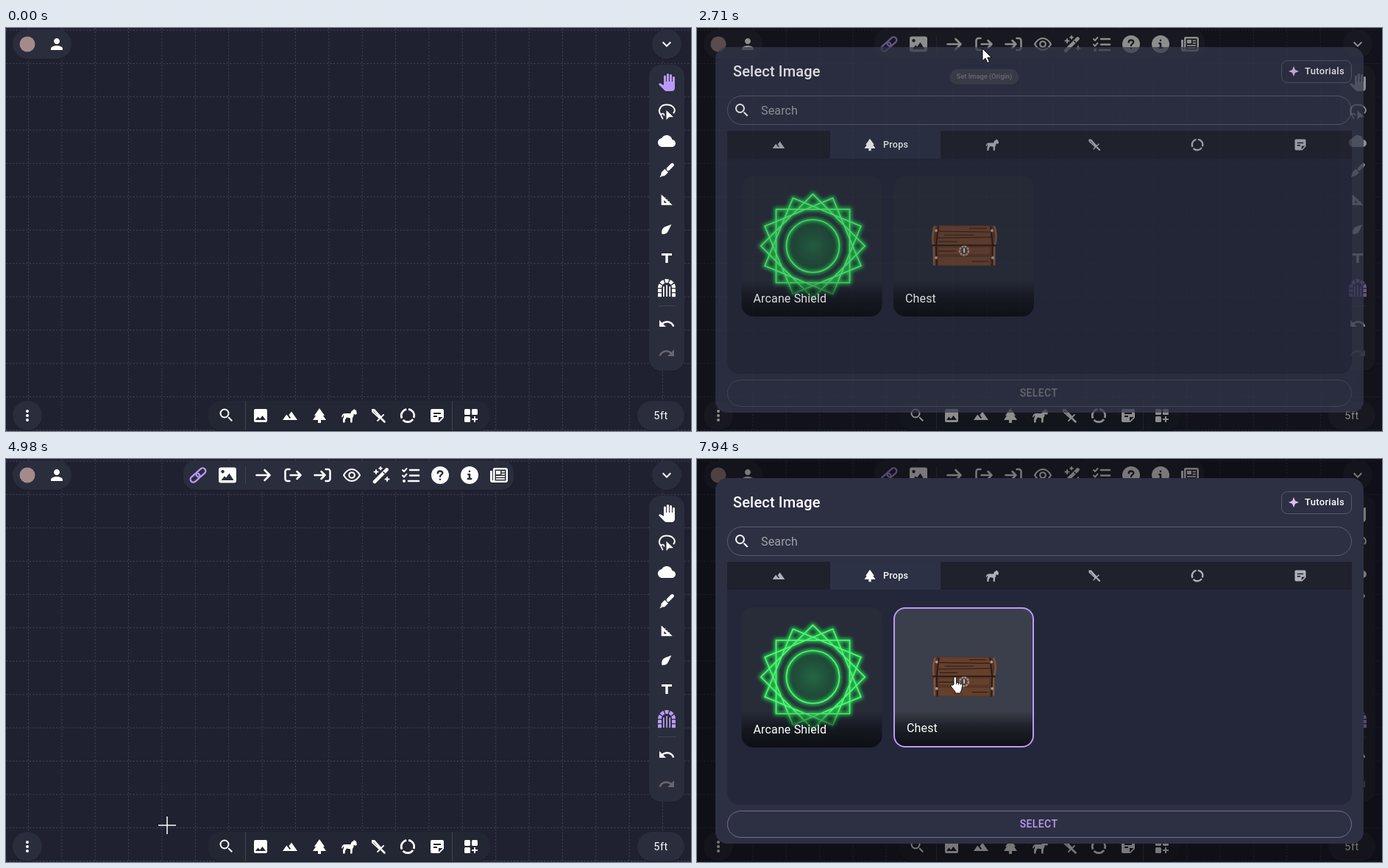
Animation of 931x549 px, one loop 8000 ms. Source, as an HTML page:

```html
<!DOCTYPE html>
<html lang="en">
<head>
<meta charset="utf-8">
<title>Portal tool</title>
<style>
  html, body { margin: 0; width: 100%; height: 100%; overflow: hidden; background: #1f2130; }
  svg { display: block; }
  text { font-family: Roboto, sans-serif; fill: #fff; }
</style>
</head>
<body>
<svg id="stage" width="931" height="549" viewBox="0 0 931 549"></svg>
<script>
const LOOP = 8000, PURPLE = '#bb9af7';

const line = (d, w = 2, extra = '') =>
  `<path d="${d}" fill="none" stroke="currentColor" stroke-width="${w}" stroke-linecap="round" stroke-linejoin="round" ${extra}/>`;
const shape = d => `<path d="${d}" fill-rule="evenodd"/>`;
const box = (x, y, w, h, r, fill, extra = '') =>
  `<rect x="${x}" y="${y}" width="${w}" height="${h}" rx="${r}" fill="${fill}" ${extra}/>`;
const text = (x, y, size, str, extra = '') =>
  `<text x="${x}" y="${y}" font-size="${size}" ${extra}>${str}</text>`;

// Icons live in a 24 x 24 box
const icons = {
  person: shape('M12 12c2.2 0 4-1.8 4-4s-1.8-4-4-4-4 1.8-4 4 1.8 4 4 4zm0 2c-2.7 0-8 1.3-8 4v2h16v-2c0-2.7-5.3-4-8-4z'),
  chevron: shape('M16.6 8.6 12 13.2 7.4 8.6 6 10l6 6 6-6z'),
  more: [6, 12, 18].map(y => `<circle cx="12" cy="${y}" r="2"/>`).join(''),
  search: '<circle cx="9.5" cy="9.5" r="5.5" fill="none" stroke="currentColor" stroke-width="2"/>' + shape('M14 15.4l1.4-1.4 5.1 5-1.5 1.5z'),
  image: shape('M21 19V5c0-1.1-.9-2-2-2H5c-1.1 0-2 .9-2 2v14c0 1.1.9 2 2 2h14c1.1 0 2-.9 2-2zM8.5 13.5l2.5 3L14.5 12l4.5 6H5z'),
  terrain: shape('M14 6.5l-3.6 4.8 2.7 3.6-1.5 1.1L7.3 10.600 2 18h20z'),
  tree: shape('M17 12h2L12 2 5 12h2l-3.900 6H10v4h4v-4h7z'),
  horse: shape('M22 5l-3-2-1 1.500c-2 .5-3 2-3.500 4.500H7c-3 0-4.500 1.500-5 5l1.500.5c.2-1.500.5-2.500 1.500-3v3l-1 2v5h2.500l.5-4 2-3 5 1v6h2.500l.5-6.500c1.500-1.500 1.500-3 1.500-5l3 .8 1.400-1.500z'),
  sword: shape('M3 3h4l10 11-3 3L3 7zM5.500 5.500v1l7.500 8z') + line('M11 19l8-8', 1.8) + line('M16.500 16.500l4 4', 2.6),
  ring: '<circle cx="12" cy="12" r="8.700" fill="none" stroke="currentColor" stroke-width="2.800" stroke-dasharray="15.500 2.720" transform="rotate(35 12 12)"/>',
  note: shape('M19 3H5c-1.100 0-2 .9-2 2v14c0 1.100.9 2 2 2h10l6-6V5c0-1.100-.9-2-2-2zM7 8h10v2H7zm0 4h5v2H7zm7 7.500V14h5.500z'),
  widgets: box(3, 3, 8, 8, 1.5, 'currentColor') + box(13, 3, 8, 8, 1.5, 'currentColor') + box(3, 13, 8, 8, 1.5, 'currentColor') + shape('M16 13h2v3h3v2h-3v3h-2v-3h-3v-2h3z'),
  hand: shape('M23 5.5V20c0 2.2-1.8 4-4 4h-7.3c-1.1 0-2.1-.4-2.850-1.200L1 14.800s1.300-1.200 1.300-1.200c.4-.3.9-.4 1.400-.1L8 15.900V4c0-.8.7-1.500 1.500-1.500S11 3.200 11 4v7h1V1.500C12 .7 12.700 0 13.500 0S15 .7 15 1.500V11h1V2.500c0-.8.7-1.500 1.500-1.500s1.500.7 1.500 1.500V11h1V5.500c0-.8.7-1.500 1.500-1.500s1.500.7 1.500 1.500z'),
  lasso: line('M4.500 16.500C-1 11 3 2.500 12 2.500s13 7 9.500 11') + line('M8.500 17a2.200 2.200 0 1 0-3.500 1.500l1.500 3', 1.7) + shape('M11.500 10v13l3.800-3.800H21z'),
  cloud: shape('M19.350 10C18.700 6.600 15.600 4 12 4 9.100 4 6.600 5.600 5.350 8 2.300 8.400 0 10.900 0 14c0 3.300 2.700 6 6 6h13c2.800 0 5-2.200 5-5 0-2.600-2-4.800-4.650-5z'),
  marker: line('M14 10l5.500-5.500', 4.8) + shape('M9.300 10l4.700 4.700-5 4.800H6.800L2.500 21.500l2-4.300V15z'),
  ruler: shape('M4 4v16h16.500zM8 12.500l4.200 4.200H8z') + line('M9 9.500l1-1M12 12.500l1-1M15 15.500l1-1', 1),
  drop: shape('M19 5L9.500 8.500C4.500 11 4 16 5 19.300c4 .7 7.500-.5 9.500-5z'),
  type: shape('M5 5v3h5.300v10h3.400V8H19V5z'),
  arch: line('M2.500 12a9.500 9.500 0 0 1 19 0', 5, 'style="stroke-linecap:butt" stroke-dasharray="4.850 1.400"') +
    [0, 19].map(x => box(x, 13.2, 5, 4.8, .6, 'currentColor') + box(x, 19.2, 5, 5, .6, 'currentColor')).join('') +
    [[7, 10], [11.2, 8], [15.4, 10]].map(([x, y]) => box(x, y, 1.7, 24 - y, .6, 'currentColor')).join(''),
  undo: shape('M12.500 8c-2.600 0-5 1-6.900 2.600L2 7v9h9l-3.600-3.600c1.400-1.200 3.200-1.900 5.100-1.900 3.500 0 6.500 2.300 7.600 5.500l2.400-.8C21.100 11 17.100 8 12.500 8z'),
  link: `<g transform="rotate(-42 12 12)" fill="none" stroke="currentColor" stroke-width="2.300"><rect x="-.5" y="8" width="14.500" height="8" rx="4"/><rect x="10" y="8" width="14.500" height="8" rx="4"/></g>`,
  picture: shape('M3 1.500h18a3 3 0 0 1 3 3v15a3 3 0 0 1-3 3H3a3 3 0 0 1-3-3v-15a3 3 0 0 1 3-3zM5.500 5a2.200 2.200 0 1 0 .01 0zM3.500 19h17L14.500 9.500l-4.500 6-2-2.300z'),
  arrow: line('M2.500 12h18M13.500 5l7 7-7 7', 2.6),
  leave: line('M7.500 4H4.500A3 3 0 0 0 1.500 7v10a3 3 0 0 0 3 3h3M8.500 12H22.500M17.500 7l5 5-5 5', 2.5),
  enter: line('M16.500 4h3a3 3 0 0 1 3 3v10a3 3 0 0 1-3 3h-3M1.500 12H15.500M10.500 7l5 5-5 5', 2.5),
  eye: line('M1 12C4.500 5.800 8.500 4 12 4s7.500 1.800 11 8c-3.500 6.200-7.500 8-11 8S4.500 18.200 1 12z', 2.1) + '<circle cx="12" cy="12" r="3.800" fill="none" stroke="currentColor" stroke-width="2.100"/>',
  wand: line('M3 21 19.500 4.500', 4.6) + '<path d="M14.500 7.500l2.500 2.500" stroke="#2a2d3b" stroke-width="1.500"/>' +
    line('M5 5v5M2.500 7.500h5M11 1v3.600M9.200 2.800h3.600M20 15v5M17.500 17.500h5', 1.9),
  checks: line('M1 5l2 2 3.500-4M1 12.500l2 2 3.500-4', 2) + line('M11 5h12M11 12.500h12M9 20h14', 2.6) + '<circle cx="3" cy="20" r="2"/>',
  help: '<circle cx="12" cy="12" r="12"/><g color="#2a2d3b">' + line('M8.700 9.300c.3-3.800 6.800-3.500 6.600 0-.1 2-3.300 2.200-3.300 4.500M12 17.700v.1', 2.4) + '</g>',
  info: '<circle cx="12" cy="12" r="12"/><g color="#2a2d3b">' + line('M10.300 11H12v6M9.800 17h4.500M12 6.800v.1', 2.4) + '</g>',
  news: shape('M6 2h15a3 3 0 0 1 3 3v14a3 3 0 0 1-3 3H3a3 3 0 0 1-3-3V6h3v13h1V4a2 2 0 0 1 2-2zM6.500 4.500v15h15v-15zM8 6h6v5H8zM15.500 6.500H20v1.800h-4.500zm0 3.300H20v1.800h-4.500zM8 13h12v1.800H8zm0 3.300h12v1.800H8z')
};
const icon = (name, cx, cy, size = 24, color = '#fff', id = '') =>
  `<g ${id && `id="${id}"`} color="${color}" fill="currentColor" transform="translate(${cx - size / 2} ${cy - size / 2}) scale(${size / 24})">${icons[name]}</g>`;

const panel = (x, y, w, h, r, fill = '#2a2d3b') =>
  box(x, y + 1, w, h, r, '#191b27') + box(x, y, w, h, r, fill);
const rule = (x, y, w, h) => box(x, y, w, h, 0, '#424450');

function grid() {
  let d = '';
  for (let x = 30.5; x < 931; x += 45.37) d += `M${x} 0V549`;
  for (let y = 3; y < 549; y += 45.4) d += `M0 ${y}H931`;
  return `<path d="${d}" stroke="#44465300" /><path d="${d}" fill="none" stroke="#414350" stroke-dasharray="2.300 2.240"/>`;
}

function room() {
  const tools = ['lasso', 'cloud', 'marker', 'ruler', 'drop', 'type'];
  const dock = ['image', 'terrain', 'tree', 'horse', 'sword', 'ring', 'note'];
  const actions = ['arrow', 'leave', 'enter', 'eye', 'wand', 'checks', 'help', 'info', 'news'];
  return grid() +
    panel(9, 2, 80, 40, 20) + '<circle cx="29" cy="22" r="10.500" fill="#a48a8c"/>' + icon('person', 69, 22) +
    panel(878, 2, 40, 40, 20) + icon('chevron', 898, 22) +
    panel(9, 508, 40, 40, 20) + icon('more', 29, 528) +
    panel(858, 508, 64, 40, 20) + text(890, 533, 14.5, '5ft', 'text-anchor="middle" letter-spacing=".5"') +
    panel(874, 50, 48, 417, 16) + icon('hand', 898, 74, 24, '#fff', 'pan') +
    tools.map((n, i) => icon(n, 898, 114 + i * 40, n == 'ruler' || n == 'drop' ? 22 : 24)).join('') +
    icon('arch', 898, 354, 24, '#fff', 'arch') + rule(886, 378, 24, 1) + icon('undo', 898, 403) +
    `<g transform="matrix(-1 0 0 1 1796 40)">${icon('undo', 898, 403, 24, '#6a666e')}</g>` +
    panel(275, 508, 382, 40, 16, '#232633') + icon('search', 299.5, 527.5) + rule(325, 508, 1, 40) +
    dock.map((n, i) => icon(n, 346 + i * 40, 528)).join('') + rule(606, 508, 1, 40) + icon('widgets', 632, 528) +
    `<g id="bar">${panel(241, 2, 449, 40, 16)}${icon('link', 261, 22, 24, PURPLE)}${icon('picture', 301, 22)}${rule(325, 10, 1, 24)}` +
    actions.map((n, i) => icon(n, 350 + i * 40, 22)).join('') + '</g>' +
    '<circle id="hover" r="20" fill="#fff" fill-opacity=".08"/>';
}

function shield() {
  const squares = [0, 22.5, 45, 67.5].map(a =>
    `<rect x="-50" y="-50" width="100" height="100" transform="rotate(${a})"/>`).join('') + '<circle r="36"/>';
  return `<g transform="translate(157.500 297)" fill="none"><circle r="36" fill="url(#glow)"/>` +
    `<g stroke="#1fd04a" stroke-width="5" filter="url(#blur)">${squares}</g>` +
    `<g stroke="#5cf07c" stroke-width="1.700">${squares}</g></g>`;
}

function chest() {
  const rivets = [[325, 276], [401, 276], [325, 313], [402, 313]].map(([x, y]) =>
    `<circle cx="${x}" cy="${y}" r="2" fill="#a8978a"/>`).join('');
  return '<path d="M322 269h82c3 8 4 18 2 27l-1 28h-84l-1-28c-2-9-1-19 2-27z" fill="#553526"/>' +
    '<path d="M329 270h69l2 25h-73zM328 299h70v9h-70zM328 312h70v11h-70z" fill="#65402d"/>' +
    '<path d="M328 277l70 1M327 286l73-1M329 291h25M370 273h24M328 304h24M374 318h22M336 282h40" stroke="#2e1c17" stroke-width="1.100" fill="none"/>' +
    '<path d="M319 296h88M328 270l-3 26 1 28M399 270l3 26-1 28" stroke="#241713" stroke-width="1.600" fill="none"/>' +
    '<path d="M323 270c-3 8-3 18-2 25M404 270c3 8 3 18 1 25M322 298v25M404 298v25" stroke="#7d5541" stroke-width="2.500" fill="none"/>' + rivets +
    '<circle cx="363" cy="303.500" r="6" fill="#4b4240" stroke="#a79180" stroke-width="2.500" stroke-dasharray="3 1"/><path d="M363 300v6" stroke="#d0c0b0" stroke-width="2"/>';
}

const card = (id, x, label, art) =>
  `<g id="${id}">${box(x, 202, 191, 191, 16, '#282c39', 'class="back"')}<g class="art">${art}</g>` +
  box(x, 202, 191, 191, 16, 'url(#shade)') + text(x + 16, 374, 16, label, 'class="label" letter-spacing=".15"') +
  box(x + 1, 203, 189, 189, 15, 'none', `class="frame" stroke="${PURPLE}" stroke-width="2"`) + '</g>';

function dialog() {
  const tabs = [['terrain', 111], ['horse', 401], ['sword', 540], ['ring', 680], ['note', 820]];
  return box(0, 0, 931, 549, 0, '#000', 'fill-opacity=".53"') + box(25, 26, 881, 498, 16, '#2d3042') +
    text(49, 66, 20, 'Select Image', 'font-weight="500" letter-spacing=".15"') +
    box(794.5, 44.5, 95, 30, 8, 'none', 'stroke="#575a6a"') +
    '<path d="M811 52l2 5 5 2-5 2-2 5-2-5-5-2 5-2z" fill="#e3bdea"/>' +
    text(826, 63, 13, 'Tutorials', 'font-weight="500" letter-spacing=".3"') +
    box(41.5, 92.5, 848, 39, 19.5, 'none', 'id="field"') + icon('search', 61, 112) +
    text(87, 118, 16, 'Search', 'letter-spacing=".15" fill-opacity=".55"') +
    box(41, 140, 849, 60, 0, '#1f212d') + '<path d="M41 178H890V455a16 16 0 0 1-16 16H57a16 16 0 0 1-16-16z" fill="#242739"/>' +
    box(181, 140, 150, 38, 0, '#2d3145') +
    tabs.map(([n, x]) => icon(n, x, 159, 20, '#b0b1b9')).join('') + icon('tree', 235, 159, 20) +
    text(253, 163, 12.5, 'Props', 'letter-spacing=".3" font-weight="500"') +
    card('shield', 60.5, 'Arcane Shield', shield()) + card('chest', 267, 'Chest', chest()) +
    box(41.5, 479.5, 848, 36, 18, 'none', 'id="pill"') +
    text(464.5, 502, 14, 'SELECT', 'id="select" text-anchor="middle" font-weight="500" letter-spacing=".4"');
}

// label, centre x, anchored edge y, box top, width, and fade-in / fade-out times
const tips = [
  ['Portals', 898, 321, -25, 52, [940, 1120, 1230, 1400]],
  ['Set Image (Origin)', 390.5, 56, 0, 111, [2260, 2420, 2560, 2780]],
  ['Set Image (Destination)', 430, 56, 0, 138, [6060, 6230, 6680, 6900]]
];
const tip = ([label, , , top, w]) =>
  `<g class="tip">${box(-w / 2, top, w, 25, 12, '#616161', 'fill-opacity=".9"')}` +
  text(0, top + 16, 11, label, 'text-anchor="middle" font-weight="500"') + '</g>';

const cursors = `
  <g id="mouse" stroke="#000" stroke-width=".9" stroke-linejoin="round">
    <circle id="click" cx="-2" cy="-1" r="12" fill="#d2c80a" fill-opacity=".75" stroke="none"/>
    <g class="cur" data-kind="arrow"><path fill="#fff" d="M0 0v17l4-3.800 2.800 6.300 2.700-1.200-2.800-6.100h5.500z"/></g>
    <g class="cur" data-kind="hand"><path transform="translate(-2 -2)" fill="#fff" d="M-2 10V1.500a1.800 1.800 0 0 1 3.600 0V7l5.800 1.500c1.800.5 2.400 1.600 2.200 3.200l-.8 5c-.2 1.200-.6 2-1.500 3.200V22H0v-1.800L-5.700 13c-1-1.500.8-3 2.200-1.700z"/>
      <path transform="translate(-2 -2)" d="M1.600 7v3M4.500 8v2.500M7.200 8.700v2.300" fill="none"/></g>
    <g class="cur" data-kind="cross"><path d="M-12 0H12M0-12V12" stroke="#fff" stroke-width="1.500"/></g>
  </g>`;

const stage = document.getElementById('stage');
stage.innerHTML = `<defs>
  <radialGradient id="glow"><stop stop-color="#20a050" stop-opacity=".5"/><stop offset="1" stop-color="#107030" stop-opacity=".35"/></radialGradient>
  <linearGradient id="shade" x1="0" y1="0" x2="0" y2="1"><stop offset=".74" stop-color="#0b0d12" stop-opacity="0"/><stop offset=".85" stop-color="#0b0d12" stop-opacity=".6"/><stop offset="1" stop-color="#0b0d12" stop-opacity=".95"/></linearGradient>
  <filter id="blur" x="-30%" y="-30%" width="160%" height="160%"><feGaussianBlur stdDeviation="2.500"/></filter>
  </defs>${room()}<g id="dialog">${dialog()}</g>${tips.map(tip).join('')}${cursors}`;

const $ = id => document.getElementById(id);
const set = (el, attrs) => { for (const k in attrs) el.setAttribute(k, attrs[k]); };
const show = (el, on) => { el.style.display = on ? '' : 'none'; };
const prog = (t, a, b) => Math.min(1, Math.max(0, (t - a) / (b - a)));
const pulse = (t, [a, b, c, d]) => Math.min(prog(t, a, b), 1 - prog(t, c, d));
const within = (t, spans) => spans.some(([a, b]) => t >= a && t < b);
const smooth = p => p * p * (3 - 2 * p);

const path = [
  [500, 735, 480], [1060, 890, 359], [1660, 890, 359], [2250, 388, 28], [3110, 388, 28], [3660, 185, 347],
  [4220, 185, 347], [4430, 219, 499], [5180, 219, 499], [5950, 429, 34], [7120, 429, 34], [7470, 353, 299], [8000, 353, 299]
];
const clicks = [[1120, 1230], [2360, 2490], [3810, 3900], [4500, 4620], [6560, 6650], [7670, 7770]];
const opened = [[2520, 4760], [6640, LOOP]];

function pointer(t) {
  const i = Math.max(1, path.findIndex(p => p[0] > t)), [a, x0, y0] = path[i - 1], [b, x1, y1] = path[i];
  const p = smooth(prog(t, a, b));
  return [x0 + (x1 - x0) * p, y0 + (y1 - y0) * p];
}

function paintCard(id, hover, picked, cx) {
  const part = c => $(id).querySelector('.' + c);
  set(part('back'), { fill: hover ? '#3b3f4b' : '#282c39' });
  set(part('label'), { transform: picked ? 'translate(2 -2)' : '' });
  set(part('art'), { transform: picked ? `translate(${cx} 297.500) scale(.98) translate(${-cx} -297.500)` : '' });
  show(part('frame'), picked);
}

function draw(t) {
  const [x, y] = pointer(t), open = within(t, opened), armed = t >= 1230;
  const over = (l, r, top, bottom) => open && x > l && x < r && y > top && y < bottom;
  const onShield = over(61, 251, 202, 393), onChest = over(267, 458, 202, 393), onSelect = over(41, 890, 479, 516);
  const onTool = !open && (x > 874 || y < 42);

  set($('pan'), { color: armed ? '#fff' : PURPLE });
  set($('arch'), { color: armed ? PURPLE : '#fff' });
  show($('bar'), armed);
  show($('hover'), onTool);
  set($('hover'), x > 874 ? { cx: 898, cy: 354 } : { cx: 390 + 40 * (x > 410), cy: 22 });

  const fade = Math.max(pulse(t, [2530, 2830, 4690, 4930]), prog(t, 6650, 6950));
  $('dialog').style.opacity = 1 - (1 - fade) ** 2;
  show($('dialog'), fade > 0);
  const first = t >= 3880 && t < 5000, second = t >= 7740;
  paintCard('shield', onShield, first, 156);
  paintCard('chest', onChest, second, 362.5);
  set($('field'), { stroke: over(41, 890, 92, 132) ? '#fff' : '#5a5d70' });
  const ready = first || second;
  set($('pill'), { stroke: ready ? '#766d98' : '#484b5c', fill: onSelect ? '#bb9af70c' : 'none' });
  $('select').style.fill = ready ? PURPLE : '#73757f';

  stage.querySelectorAll('.tip').forEach((el, i) => {
    const [, cx, cy, , , times] = tips[i], k = pulse(t, times);
    set(el, { transform: `translate(${cx} ${cy}) scale(${.77 + .23 * k})`, opacity: k * .9 });
  });

  const kind = open ? (onShield || onChest || onSelect ? 'hand' : 'arrow') : !armed || onTool ? 'hand' : 'cross';
  stage.querySelectorAll('.cur').forEach(el => show(el, el.dataset.kind == kind));
  show($('mouse'), t >= 500);
  show($('click'), within(t, clicks));
  set($('mouse'), { transform: `translate(${x} ${y})` });
}

const start = performance.now();
function tick() {
  draw((performance.now() - start) % LOOP);
  requestAnimationFrame(tick);
}
tick();
</script>
</body>
</html>
```
